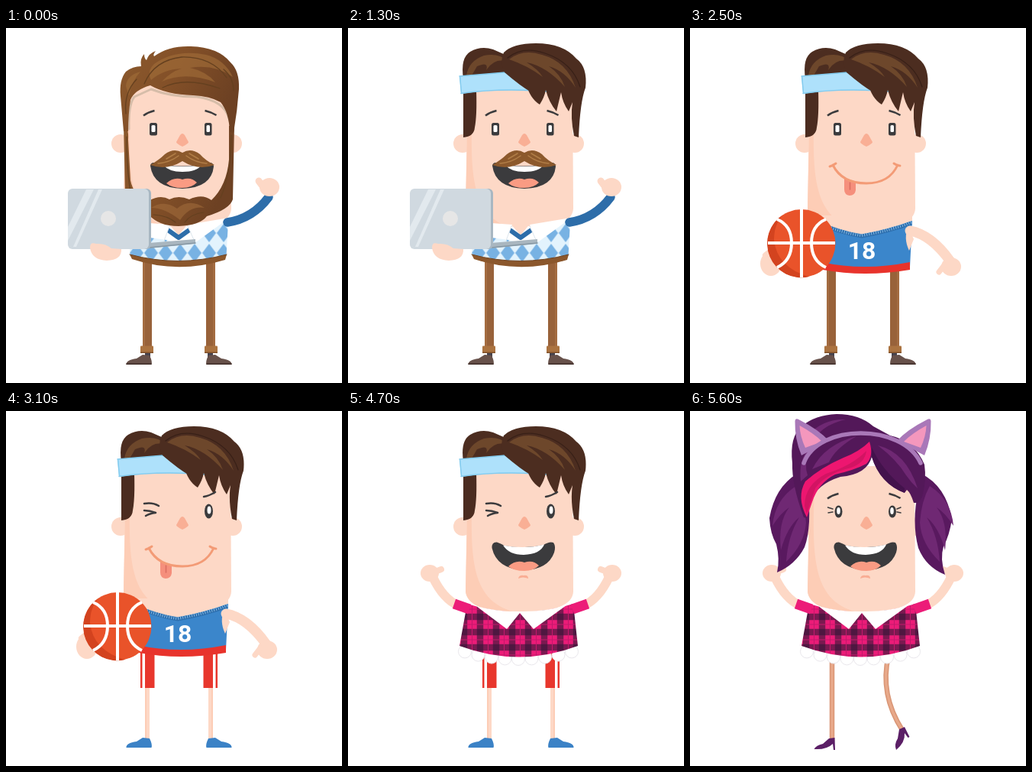
An HTML page that plays this animation: 440 px wide and 464 px high, repeating every 6600 ms.

```html
<!DOCTYPE html>
<html lang="en">
<head>
<meta charset="utf-8">
<title>Character dress-up</title>
<style>
html, body { margin: 0; width: 100%; height: 100%; overflow: hidden; background: #fff; }
svg { display: block; width: 440px; height: 464px; }
</style>
</head>
<body>
<svg id="stage" viewBox="0 0 440 464" xmlns="http://www.w3.org/2000/svg">
<defs>
  <pattern id="argyle" x="180.5" y="281" width="19" height="26" patternUnits="userSpaceOnUse">
    <rect width="19" height="26" fill="#e3f3fd"/>
    <path d="M9.5 1L18.5 13 9.5 25 .5 13Z" fill="#78b2e3"/>
  </pattern>
  <pattern id="plaid" x="168" y="264" width="21" height="20" patternUnits="userSpaceOnUse">
    <rect width="21" height="20" fill="#ec1c78"/>
    <g stroke="#2b1433" stroke-width="8.5" opacity=".95">
      <path d="M5 0V20" opacity=".62"/><path d="M0 5H21" opacity=".62"/>
    </g>
    <path d="M15.5 0V20M0 15H21" stroke="#c4186c" stroke-width="1"/>
  </pattern>
  <linearGradient id="brown" x1="0" x2="1" y2=".4">
    <stop stop-color="#8b592d"/><stop offset=".5" stop-color="#835028"/><stop offset="1" stop-color="#6d4123"/>
  </linearGradient>
</defs>
</svg>
<script>
const LOOP = 6600;
const SKIN = '#fdd8c6', SHADE = '#fdcdb6', INK = '#3b3b3d';

const fill = (d, c, extra = '') => `<path d="${d}" fill="${c}" ${extra}/>`;
const line = (d, c, w, cap = 'round') =>
  `<path d="${d}" fill="none" stroke="${c}" stroke-width="${w}" stroke-linecap="${cap}" stroke-linejoin="round"/>`;
const dot = (x, y, r, c, ry = r) => `<ellipse cx="${x}" cy="${y}" rx="${r}" ry="${ry}" fill="${c}"/>`;
const box = (x, y, w, h, c, r = 0) => `<rect x="${x}" y="${y}" width="${w}" height="${h}" rx="${r}" fill="${c}"/>`;
const flip = s => `<g transform="matrix(-1 0 0 1 453 0)">${s}</g>`;
const pair = s => s + flip(s);

const shoe = c => fill('M157.5 440Q157 434 171 432L179 427 188 428Q192 436 190.5 440Z', c);

// Legs
const trousers = pair(
  box(182, 424, 7, 8, '#46434d') + box(179, 300, 12, 118, '#98623a') + box(179, 300, 3, 118, '#a46c41') +
  box(176, 415.5, 17, 9, '#ab7340', 1) + box(176, 423.5, 17, 1.5, '#80512a') +
  shoe('#67514a') + box(157.5, 438, 33, 2, '#4b3833'));
const shorts = pair(
  box(182, 358, 6, 74, SKIN) + box(182, 358, 2, 74, SHADE) +
  box(176, 308, 18.5, 54, '#e8372d') + box(178.5, 308, 3.5, 54, '#fff') + shoe('#3b82c6'));
const tan = d => line(d, '#d99676', 6.5, 'butt') + line(d, '#e8a98a', 3.5, 'butt');
const heels =
  tan('M186 320V432') + tan('M260 320Q248 370 278 417') +
  fill('M162.5 442Q165 437 174 435L182 428 189.5 427 190 443 188 443 187 435Q179 443 162.5 442Z', '#5b1f66') +
  fill('M270 443Q267 436 272 428L274 416 281 413 287.5 426 285.5 427 281 421Q282 433 270 443Z', '#5b1f66');

// Torsos
const sweater =
  fill('M160 250Q225 270 292 248L289 298Q225 314 163 298Z', '#fff') +
  fill('M163 251L188 274 210 277 226 281 250 279 287 252 291 254 288.5 298Q225 314 162 298Z', 'url(#argyle)') +
  fill('M212 255H239L226 271Z', SKIN) +
  line('M212 264L226 274 240 264', '#2d6da9', 6, 'butt') +
  fill('M188 255L215 257 207 278ZM238 257L292 248 247 279Z', '#fff') +
  line('M214 259L207 278M238 259L247 279', '#dce5ec', 1) +
  fill('M162 296Q225 313 289 296L287 303Q225 322 165 302Z', '#8b572c') +
  line('M162 296Q225 313 289 296', '#6f4321', 1);
const jersey =
  fill('M160 245H291V255Q260 264 225 274Q190 266 160 252Z', SKIN) +
  fill('M163 250Q198 266 225 270Q260 263 291 252L288 312Q228 324 172 310Z', '#3b86cb') +
  line('M165 254Q198 268 225 272Q260 266 290 255', '#2d6fae', 5, 'butt') +
  `<path d="M165 253Q198 268 225 271Q260 265 290 254" fill="none" stroke="#85b9e4" stroke-width="4" stroke-dasharray="1 2"/>` +
  fill('M172 306Q228 318 288 306V316Q228 326 174 316Z', '#e8332c') +
  '<text x="225" y="302" text-anchor="middle" font-family="Roboto, Inter, sans-serif" font-weight="700" font-size="32" fill="#fff">18</text>';
const lace = Array.from({ length: 9 }, (_, i) => {
  const x = 153 + i * 17.5, y = 313 + 11 * (1 - ((x - 223) / 75) ** 2);
  return `<circle cx="${x}" cy="${y}" r="8.5" fill="#fff" stroke="#e9e7ec"/>`;
}).join('');
const blouse = lace +
  fill('M156 252Q225 274 295 252L301 307Q224 336 146 307Z', 'url(#plaid)') +
  fill('M168 255Q198 263 225 262Q255 263 286 254L243 285 225 264 208 285Z', '#fff');

// Arms and props
const laptop =
  line('M290 254Q323 249 344 221', '#2d6da9', 11.5) +
  dot(345, 208, 13, SKIN, 12) + line('M337 208L331 200', SKIN, 9) +
  fill('M187 281L248 276V282L187 288Z', '#a9b6bf') + line('M188 287L248 281', '#8798a4', 1.5) +
  box(84, 210, 106, 79, '#a8b7c2', 6) + box(81, 210, 106, 79, '#d0d9e0', 6) +
  fill('M81 260L105 211H115L81 278ZM88 286L121 211H126L92 286Z', '#e2e9ee') +
  dot(134, 249, 10, '#e6e6e6') +
  fill('M110 287Q110 279 118 282Q130 281 138 288L151 289Q152 303 132 304Q112 303 110 287Z', SKIN);
const ball =
  line('M288 265Q316 270 341 305', SKIN, 13) + dot(342, 312, 13, SKIN, 12) +
  line('M333 310L326 319', SKIN, 7) + fill('M286 260Q279 274 287 291L293 276Z', SKIN) +
  dot(106, 308, 14, SKIN, 16) + line('M99 297L104 293', SKIN, 8) +
  dot(146, 281.5, 44.5, '#e9532a') +
  fill('M122 244A44.5 44.5 0 0 0 156 325Q114 313 110 277Q110 256 122 244Z', '#d3431f') +
  line('M146 237V326M102 281H190M114 250Q133 258 133 281T114 313M178 250Q159 258 159 281T178 313', '#fff', 4, 'butt');
const cheer = pair(
  line('M144 254Q125 246 111 217', SKIN, 12) +
  dot(107, 212, 12, SKIN, 11) + line('M114 210L122 207', SKIN, 8) +
  line('M159 259L139 252', '#ec1c78', 13, 'butt'));

// Hair
const combed =
  line('M161 132Q160 100 168 90L190 80Q215 90 250 90Q286 95 292 118', '#d6bda9', 3) +
  fill('M154 135Q152 112 150 89Q148 68 157 57Q166 50 177 50Q175 40 181 34Q181 40 184 42Q187 33 196 30Q192 35 194 37Q213 23 242 24Q278 25 294 45Q306 56 305 80Q303 108 298 137L293 136Q292 110 281 97Q267 89 245 88Q210 87 189 75Q168 81 163 94Q160 112 160 135Z', 'url(#brown)') +
  fill('M194 47Q222 27 262 35Q286 41 297 64Q273 47 241 52Q263 57 274 71Q235 56 204 70Q216 57 230 53Q206 54 190 68Q184 57 194 47ZM157 76Q158 62 176 57Q165 69 161 89Z', '#a06c38', 'opacity=".65"') +
  line('M181 73Q194 42 230 38Q269 37 289 65M205 78Q235 63 280 79M157 112Q154 85 171 67M298 82Q298 65 285 54', '#65401f', 1.3);
const band =
  fill('M151 84L168 82Q169 115 166 130Q165 142 151 143Z', '#4b2c20') +
  fill('M151 66Q147 39 160 31Q174 23 190 28L206 35L210 66Z', '#4c2d20') +
  fill('M155 62Q158 43 178 36Q197 32 209 43Q191 39 181 55Q185 43 169 50L162 62Z', '#79502f', 'opacity=".75"') +
  fill('M146 63L206 58 264 78V84Q200 78 148 86Z', '#aee1fb') +
  line('M146 63L206 58M148 85.5Q200 78 262 83M146.5 63L148.5 85', '#83cbee', 1.5) +
  fill('M205 58Q198 44 204 32Q216 20 246 20Q282 20 299 40Q314 51 311 78Q304 96 302 143L296 141Q291 116 294 97L289 109Q281 98 279 84L273 109Q263 97 259 81Q257 91 251 100Q238 92 233 72L240 84Q226 76 205 58Z', '#4c2d20') +
  fill('M211 41Q229 27 254 35Q287 44 298 78Q284 56 263 50Q279 61 284 77Q260 50 234 45Q250 55 255 64Q235 49 211 41Z', '#79502f', 'opacity=".75"') +
  line('M209 39Q229 23 258 33Q294 45 304 77', '#382017', 1.3);
const tail = d => fill(d, '#59195f');
const locks = d => fill(d, '#6f2873');
const cat =
  tail('M140 82Q111 100 104 140Q105 160 113 174Q118 194 114 211Q138 201 150 178Q160 151 154 98Z') +
  tail('M303 82Q335 98 343 141Q340 162 332 177Q327 193 334 214Q309 204 299 179Q290 145 299 104Z') +
  pair(locks('M139 98Q111 116 108 150Q119 133 130 126Q115 145 119 182Q127 152 143 139Q128 164 126 197Q150 174 152 146Q150 117 139 98Z')) +
  fill('M149 139Q133 96 134 68Q130 34 146 20Q164 5 192 4Q222 4 240 20L262 32Q294 39 307 70Q310 90 304 112L299 120H293Q289 107 284 103L281 107Q249 95 238 60Q232 83 197 86Q165 96 158 119L153 140Z', '#531859') +
  locks('M160 76Q176 44 218 33Q190 49 182 67ZM145 92Q142 63 156 49Q149 70 154 84ZM154 32Q174 10 204 11Q179 17 168 30ZM246 45Q283 54 298 101Q289 93 283 84Q271 64 246 45Z') +
  fill('M238 48Q252 78 281 101L281 107Q249 95 238 60Z', '#43124c') +
  fill('M153 139Q139 113 151 92Q171 74 201 61Q222 53 235 40Q241 59 231 69Q216 77 190 83Q168 94 160 119Z', '#ed1670') +
  fill('M150 124Q150 97 178 82Q213 71 231 52Q229 68 211 74Q177 82 164 101L153 134Z', '#d21463') +
  pair(fill('M146 58Q137 37 137.5 13Q138 8 144 12Q168 24 182 39Z', '#a978b8') +
    fill('M151 48Q144 33 143.5 19Q162 29 173 40Z', '#f497bd')) +
  line('M149 68C168 16 278 16 302 68', '#a978b8', 5.5);

const beard =
  fill('M154 127Q161 130 160 146L163 199Q167 220 187 226Q202 217 214 224Q226 218 240 224Q257 216 269 225Q289 206 292 172L292 128 299 127 297 224Q293 237 263 246Q254 258 226 259Q200 259 187 244Q158 240 156 215Z', 'url(#brown)') +
  fill('M190 235Q207 224 224 236Q240 222 260 235Q241 232 228 251Q208 235 190 235Z', '#a16c3b', 'opacity=".6"') +
  line('M158 142Q158 185 163 214M295 140Q295 190 281 222M193 244Q211 245 222 254M259 241Q242 243 234 254', '#64401f', 1.2);
const moustache =
  fill('M189 179Q201 172 208 165Q220 156 231 163Q242 156 254 165Q261 173 273 179Q252 187 231 174Q210 187 189 179Z', '#8c592c') +
  line('M199 177Q214 176 226 167M263 177Q248 176 236 167M210 171L222 164M252 171L240 164', '#b07d47', 1.5);

// Mouths
const tongue = fill('M210 203Q220 194 231 198Q242 194 250 202Q243 209 231 209Q217 209 210 203Z', '#fa9b83');
const grin =
  fill('M189 180Q190 174 198 177Q231 184 263 177Q271 174 272 181Q269 209 231 210Q193 209 189 180Z', INK) +
  fill('M206 179Q231 183 256 179Q250 188 231 188Q213 188 206 179Z', '#fff') + tongue;
const cheeky =
  fill('M202 196Q210 201 217 202V212Q216 219 209 219Q202 218 202 211Z', '#f58f7c') +
  line('M209.5 202V211', '#d96d60', 1.5) +
  line('M187 179Q199 203 231 203Q261 203 272 179M183 181Q187 180 191 177M267 177Q271 180 275 180', '#f39b76', 3);
const laugh =
  fill('M188.5 179Q188 171 195 171.5Q200 173 205 176Q231 181 256 175Q264 170 269 172Q272.5 177 270 185Q262 207 231 208Q195 207 188.5 179Z', INK) +
  fill('M203 175.5Q231 181 257 174.5Q252 187 230 188Q211 188 203 175.5Z', '#fff') + tongue +
  fill('M223 219Q224 214 230 215Q236 214 236 219Q229 216 223 219Z', '#f9ad94');

// Eyes
const brows = line('M180 114.5Q186 110 194.5 108M260.5 108Q269 110 275.5 114', INK, 2.5, 'butt');
const calm = brows +
  box(188, 124, 10, 16.5, INK, 2.5) + box(190.5, 127, 5, 9, '#fff', 1.5) +
  box(260, 124, 9.5, 16.5, INK, 2.5) + box(262.5, 127, 4.5, 9, '#fff', 1.5);
const wink =
  line('M181 121Q192 119 200 124M181 130Q188 130 196 133Q188 134 183 137M259 112Q266 111 274 106', INK, 2.5) +
  dot(265.5, 131, 5.5, INK, 9.5) + dot(266, 129.5, 2.5, '#fff', 5);
const lashes = brows +
  dot(194.5, 131.5, 5, INK, 8) + dot(194.5, 130.5, 2.3, '#fff', 4.5) +
  dot(265, 131.5, 5, INK, 8) + dot(264.5, 130.5, 2.3, '#fff', 4.5) +
  line('M180.5 126L187 128M181 133L187 132M276 126L271 128M276 133L271 132', INK, 1.5);

const head =
  dot(150, 151, 12, SKIN) + dot(297, 151, 12, SKIN) +
  fill('M157 72H294L295 236Q294 262 225 264Q157 263 154 236Z', SKIN) +
  fill('M157 85L163 95C160 190 158 252 225 264Q157 263 154 236Z', SHADE);
const nose = fill('M228 140Q231 136 234 140L239 149Q239 151 231 155Q223 151 223 149Z', '#f9af95');

// Layers from back to front; each lists [start time, drawing]
const layers = [
  [[0, trousers], [2800, shorts], [5300, heels]],
  [[0, head]],
  [[0, sweater], [2500, jersey], [4700, blouse]],
  [[0, beard], [1000, '']],
  [[0, laptop], [2200, ball], [4400, cheer]],
  [[0, combed], [1300, band], [5000, cat]],
  [[0, grin], [1900, cheeky], [4100, laugh]],
  [[0, moustache], [1600, '']],
  [[0, nose]],
  [[0, calm], [3100, wink], [5600, lashes]]
];

const stage = document.getElementById('stage');
const parts = layers.flatMap(looks => looks.map(([start, art], i) => {
  const node = document.createElementNS('http://www.w3.org/2000/svg', 'g');
  node.innerHTML = art;
  stage.appendChild(node);
  return { node, start, end: looks[i + 1]?.[0] ?? LOOP };
}));

function draw(time) {
  const t = time % LOOP;
  for (const { node, start, end } of parts)
    node.style.display = t >= start && t < end ? '' : 'none';
}

const began = performance.now();
function tick() {
  draw(performance.now() - began);
  requestAnimationFrame(tick);
}
draw(0);
requestAnimationFrame(tick);
</script>
</body>
</html>
```
